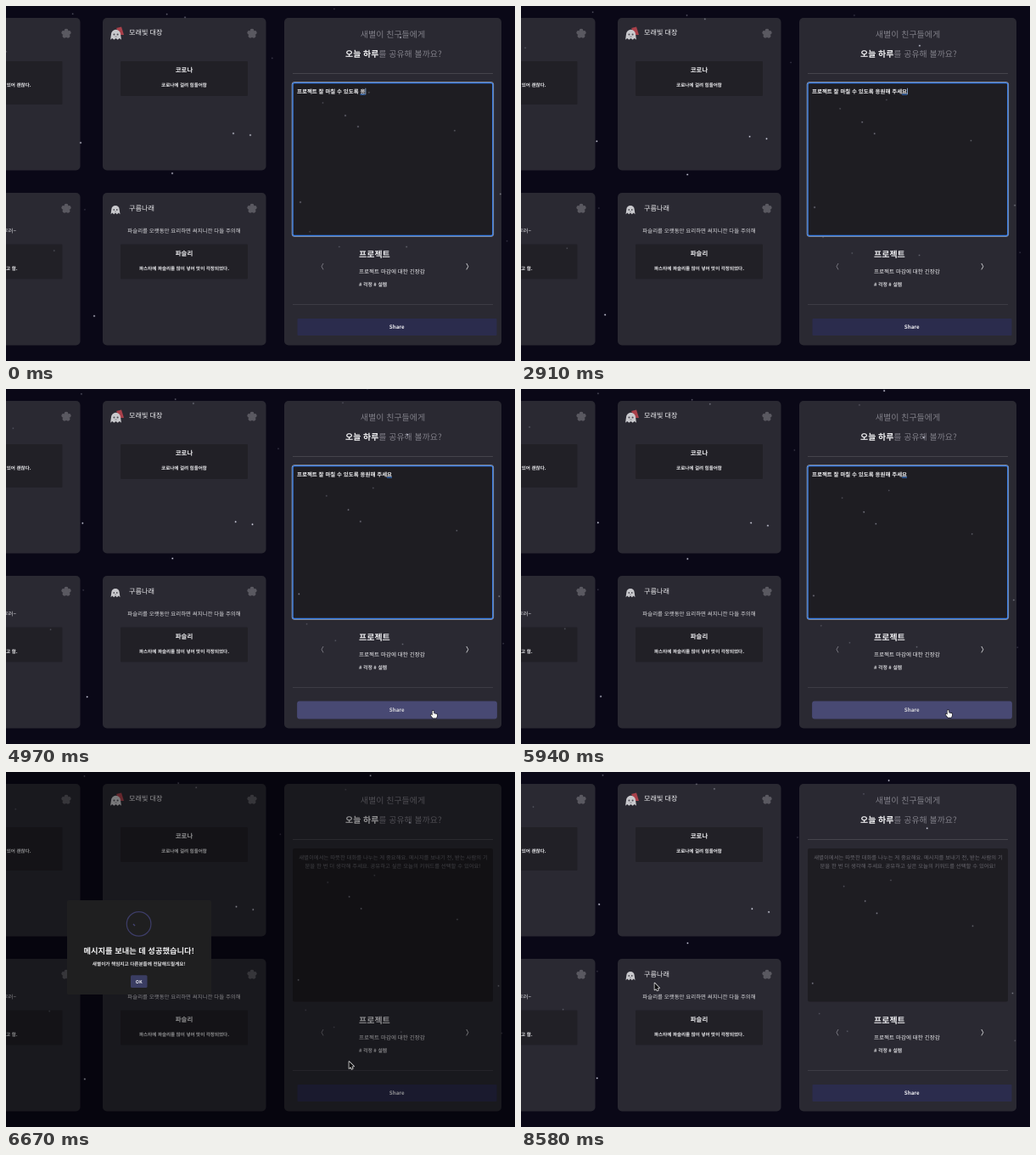
These frames come from a looping animation (600 by 418 pixels, 8.61 s). An HTML page with a canvas:

```html
<!DOCTYPE html>
<html lang="ko">
<head>
<meta charset="utf-8">
<title>오늘 하루</title>
<style>
html, body { margin: 0; width: 600px; height: 418px; overflow: hidden; background: #0a0817; }
canvas { display: block; }
</style>
</head>
<body>
<canvas id="stage" width="600" height="418"></canvas>
<script>
const ctx = document.getElementById('stage').getContext('2d');
const LOOP = 8610;
const FAMILY = '"Noto Sans CJK KR", "Noto Sans KR", "Noto Sans CJK JP", sans-serif';
const BLUR = 6000, OPEN = 6132, CLOSE = 7810, KEY_TIME = 225;
const PANEL = '#212026', BRIGHT = '#ececef', SOFT = '#d8d8dc', DIM = '#7f7e87';
if ('textRendering' in ctx) ctx.textRendering = 'geometricPrecision';

const clamp = v => Math.max(0, Math.min(1, v));
const span = (t, a, b) => clamp((t - a) / (b - a));
const mix = (a, b, k) => a + (b - a) * k;
const easeOut = k => 1 - (1 - k) * (1 - k);
const smooth = k => k * k * (3 - 2 * k);

function random(seed) {
  return () => (seed = seed * 16807 % 2147483647) / 2147483647;
}

// The brightest stars by place, the faint ones by chance
const rnd = random(77);
const STARS = [
  [88, 161], [104, 365], [268, 150], [288, 152], [196, 197],
  [465, 37], [415, -15], [400, 129], [415, 142], [347, 231]
].map(([x, y]) => ({ x, y, a: x > 330 && y > 90 ? .4 : .85 }));
for (let i = 0; i < 16; i++) STARS.push({ x: rnd() * 600, y: rnd() * 418, a: .15 + rnd() * .2 });

// Pointer tip: time, x, y
const PATH = [
  [3300, 525, 302], [3820, 524, 307], [4150, 538, 330],
  [4970, 503.5, 379], [6300, 503.5, 378], [7350, 157.5, 248.5]
];

// Every state a Hangul input method passes through while typing a string
function composeStates(str) {
  const initials = 'ㄱㄲㄴㄷㄸㄹㅁㅂㅃㅅㅆㅇㅈㅉㅊㅋㅌㅍㅎ';
  const states = [];
  let done = '';
  for (const ch of str) {
    const code = ch.charCodeAt(0) - 0xac00;
    if (code >= 0) {
      states.push(done + initials[Math.floor(code / 588)]);
      if (code % 28) states.push(done + String.fromCharCode(0xac00 + code - code % 28));
    }
    done += ch;
    states.push(done);
  }
  return states;
}
const TYPED = ['', ...composeStates('원해 주세요')];

function box(x, y, w, h, r, fill) {
  ctx.fillStyle = fill;
  ctx.beginPath();
  ctx.roundRect(x, y, w, h, r);
  ctx.fill();
}

function frame(x, y, w, h, r, color, width) {
  ctx.strokeStyle = color;
  ctx.lineWidth = width;
  ctx.beginPath();
  ctx.roundRect(x, y, w, h, r);
  ctx.stroke();
}

function text(str, x, y, size, color, weight = 400, align = 'left') {
  ctx.font = `${weight} ${size}px ${FAMILY}`;
  ctx.fillStyle = color;
  ctx.textAlign = align;
  ctx.fillText(str, x, y + size * .37);
  return ctx.measureText(str).width;
}

function line(points, color, width) {
  ctx.strokeStyle = color;
  ctx.lineWidth = width;
  ctx.beginPath();
  points.forEach(([x, y]) => ctx.lineTo(x, y));
  ctx.stroke();
}

function dot(x, y, r, color) {
  ctx.fillStyle = color;
  ctx.beginPath();
  ctx.arc(x, y, r, 0, 7);
  ctx.fill();
}

function flower(x, y) {
  for (let i = 0; i < 5; i++) {
    const a = i * Math.PI * .4 - Math.PI / 2;
    dot(x + 3.4 * Math.cos(a), y + 3.4 * Math.sin(a), 2.4, '#5a5961');
  }
  dot(x, y, 3, '#5a5961');
}

function jelly(x, y, s) {
  ctx.save();
  ctx.translate(x, y);
  ctx.scale(s, s);
  ctx.fillStyle = '#c9c9cd';
  ctx.beginPath();
  ctx.arc(0, 0, 4.8, Math.PI, 0);
  for (let i = 0; i <= 6; i++) ctx.lineTo(5.6 - i * 11.2 / 6, i % 2 ? 4 : 5.6);
  ctx.fill();
  for (const side of [-1, 1]) dot(side * 1.8, .2, .9, '#4b4a52');
  line([[-1, 2.4], [1, 2.4]], '#77767e', .7);
  ctx.restore();
}

const card = (x, y, w, h) => box(x, y, w, h, 5, '#2a2932');

function note(y, title, body) {
  box(135, y, 150, 41, 1, PANEL);
  text(title, 210, y + 10.5, 7.4, BRIGHT, 700, 'center');
  text(body, 210, y + 28, 5.53, BRIGHT, 700, 'center');
}

function board() {
  for (const y of [14, 220]) {
    for (const x of [-105, 114]) {
      card(x, y, 192.5, 179.5);
      flower(x + 176, y + 18.5);
    }
  }
  box(-84, 65, 150.5, 51, 1, PANEL);
  box(-84, 280.5, 150.5, 41, 1, PANEL);
  text('있어 괜찮다.', 29.5, 93, 5.53, BRIGHT, 700, 'right');
  text('부러~', 12, 265, 6.45, SOFT, 400, 'right');
  text('고 함.', 13.5, 309, 5.53, BRIGHT, 700, 'right');

  ctx.fillStyle = '#a8404a';
  ctx.fill(new Path2D('M130 26 L136 24.5 L139 34 L134 34 Z'));
  jelly(129.5, 33.3, 1.15);
  jelly(129, 239.7, .98);
  text('모래빛 대장', 145, 31, 8.1, BRIGHT);
  text('구름나래', 145, 237.5, 8.15, BRIGHT);
  note(65, '코로나', '코로나에 걸려 힘들어함');
  note(280.5, '파슬리', '파스타에 파슬리를 많이 넣어 맛이 걱정되었다.');
  text('파슬리를 오랫동안 요리하면 써지니깐 다들 주의해', 210, 265, 6.45, SOFT, 400, 'center');
}

function typing(t) {
  const step = Math.min(TYPED.length - 1, Math.floor(t / KEY_TIME));
  const full = '프로젝트 잘 마칠 수 있도록 응' + TYPED[step];
  const end = 343 + text(full, 343, 100.5, 6.48, '#f4f4f6', 700);
  const last = full.slice(-1);
  if (last !== ' ') {
    const w = ctx.measureText(last).width;
    box(end - w, 103.6, w, 1, 0, '#3f86e8');
  }
  const idle = t - (TYPED.length - 1) * KEY_TIME;
  if (idle < 0 || idle % 900 < 450) box(end, 96.8, .8, 7.5, 0, '#9fc0ee');
}

function form(t) {
  card(328, 14, 256, 385.5);
  text('새별이 친구들에게', 456, 33.5, 10, DIM, 300, 'center');
  const w = text('오늘 하루', 400, 56, 9.95, '#f2f2f4', 700);
  text('를 공유해 볼까요?', 400 + w, 56, 9.95, DIM, 300);
  box(338, 79, 236, 1, 0, '#45444c');
  box(338, 90, 236, 180.5, 2, '#1e1d22');

  if (t < BLUR) {
    frame(337.2, 89.7, 237.4, 181.6, 2.5, 'rgba(215,232,255,.75)', .8);
    frame(338.1, 90.6, 235.6, 179.8, 2, '#3b82ee', 1.2);
  }
  if (t < OPEN) typing(t);
  else {
    text('새별이에서는 따뜻한 대화를 나누는 게 중요해요. 메시지를 보내기 전, 받는 사람의 기', 456.5, 100.8, 6.38, '#66656c', 400, 'center');
    text('분을 한 번 더 생각해 주세요. 공유하고 싶은 오늘의 키워드를 선택할 수 있어요!', 456, 111, 6.38, '#66656c', 400, 'center');
  }

  text('프로젝트', 416, 292, 10, BRIGHT, 700);
  text('프로젝트 마감에 대한 긴장감', 416, 312.5, 6.55, BRIGHT);
  text('# 걱정 # 설렘', 416, 327.5, 5.8, SOFT, 700);
  for (const side of [-1, 1]) {
    const x = 458.4 + side * 86.4;
    line([[x - side * 2, 303], [x, 306.7], [x - side * 2, 310.4]], side < 0 ? DIM : SOFT, .9);
  }
  box(338, 351, 236, 1, 0, '#3d3c45');

  const hover = span(t, 4550, 4650) * (1 - span(t, OPEN, OPEN + 60));
  const rgb = [[43, 72], [44, 73], [77, 115]].map(([a, b]) => Math.round(mix(a, b, hover)));
  box(343.5 - hover * .4, 368 - hover * .5, 235 + hover * .8, 20 + hover, 1 + hover * 2, `rgb(${rgb})`);
  text('Share', 460.7, 378, 6.2, hover > .5 ? SOFT : '#f0f0f4', 700, 'center');
}

// The whole sky turns slowly around one point
function sky(t) {
  ctx.save();
  ctx.translate(147, 204);
  ctx.rotate(.09 * t / 8580);
  for (const { x, y, a } of STARS) {
    dot(x - 147, y - 204, 1.5, `rgba(190,195,225,${a * .2})`);
    dot(x - 147, y - 204, .8, `rgba(240,240,250,${a})`);
  }
  ctx.restore();
}

function meteor(t) {
  if (t < 1790 || t > 2110) return;
  const d = (t - 1880) * .6;
  const x = 113 - d * .83, y = 195 + d * .56;
  const a = span(t, 1790, 1850) * (1 - span(t, 1980, 2110));
  const g = ctx.createLinearGradient(x, y, x + 38, y - 25.6);
  g.addColorStop(0, `rgba(255,255,255,${a})`);
  g.addColorStop(1, 'rgba(255,255,255,0)');
  line([[x, y], [x + 38, y - 25.6]], g, 1.2);
}

function popScale(k) {
  if (k < .45) return mix(.7, 1.05, easeOut(k / .45));
  if (k < .8) return mix(1.05, .95, smooth((k - .45) / .35));
  return mix(.95, 1, smooth((k - .8) / .2));
}

function checkMark(k) {
  const tip = span(k, .54, .7), arm = span(k, .7, .88);
  if (!tip) return;
  const points = [[150, 179], [mix(150, 154.5, tip), mix(179, 183.7, tip)]];
  if (arm) points.push([mix(154.5, 164, arm), mix(183.7, 173.8, arm)]);
  line(points, '#454576', 1.4);
}

function dialog(t) {
  if (t < OPEN || t > CLOSE + 150) return;
  const out = span(t, CLOSE, CLOSE + 150);
  ctx.fillStyle = `rgba(0,0,0,${.4 * span(t, OPEN, OPEN + 100) * (1 - out)})`;
  ctx.fillRect(0, 0, 600, 418);

  const s = popScale(span(t, OPEN, OPEN + 300)) * (1 - out * .5);
  ctx.save();
  ctx.globalAlpha = 1 - out;
  ctx.translate(157, 206.5);
  ctx.scale(s, s);
  ctx.translate(-157, -206.5);
  box(72, 151, 170, 111, 1.5, '#1f1f20');
  frame(142.3, 164.6, 28.6, 28.6, 14.3, '#3d3d68', 1.2);
  checkMark(span(t, OPEN + 80, OPEN + 830));
  text('메시지를 보내는 데 성공했습니다!', 156.7, 210.3, 9.25, '#f2f2f3', 700, 'center');
  text('새별이가 책임지고 다른분들께 전달해드릴게요!', 156.7, 226, 5.6, '#e4e4e6', 700, 'center');
  box(147, 239.3, 19.5, 14.7, 1.5, t > 7250 ? '#2b2e50' : '#3a3d62');
  text('OK', 156.7, 246.7, 5.3, '#f0f0f4', 700, 'center');
  ctx.restore();
}

const ARROW = new Path2D('M0 0 V8 L1.8 6.4 L3 8.9 L4.3 8.3 L3.2 5.9 L5.6 5.7 Z');
const HAND = new Path2D('M-.9 0 H.7 L.9 3 L4.6 4 V6.2 L3.7 8.6 H-.2 L-3 5 L-2.3 4.2 L-.9 5.2 Z');

function pointer(t) {
  if (t < PATH[0][0]) return;
  const i = PATH.findIndex(p => p[0] > t);
  const a = PATH.at(i < 0 ? -1 : i - 1), b = PATH.at(i);
  const k = i < 0 ? 0 : smooth(span(t, a[0], b[0]));
  const link = (t >= 4550 && t < OPEN) || (t >= 7250 && t < CLOSE + 60);
  const shape = link ? HAND : ARROW;
  ctx.save();
  ctx.translate(mix(a[1], b[1], k), mix(a[2], b[2], k));
  ctx.lineJoin = 'round';
  ctx.lineWidth = link ? 1.2 : 1.5;
  ctx.strokeStyle = link ? '#141418' : '#e8e8e8';
  ctx.stroke(shape);
  ctx.fillStyle = link ? '#f6f6f6' : '#0c0c0e';
  ctx.fill(shape);
  ctx.restore();
}

function draw(t) {
  ctx.fillStyle = '#0a0817';
  ctx.fillRect(0, 0, 600, 418);
  board();
  form(t);
  sky(t);
  meteor(t);
  dialog(t);
  pointer(t);
}

const start = performance.now();
function tick() {
  draw((performance.now() - start) % LOOP);
  requestAnimationFrame(tick);
}
tick();
</script>
</body>
</html>
```
